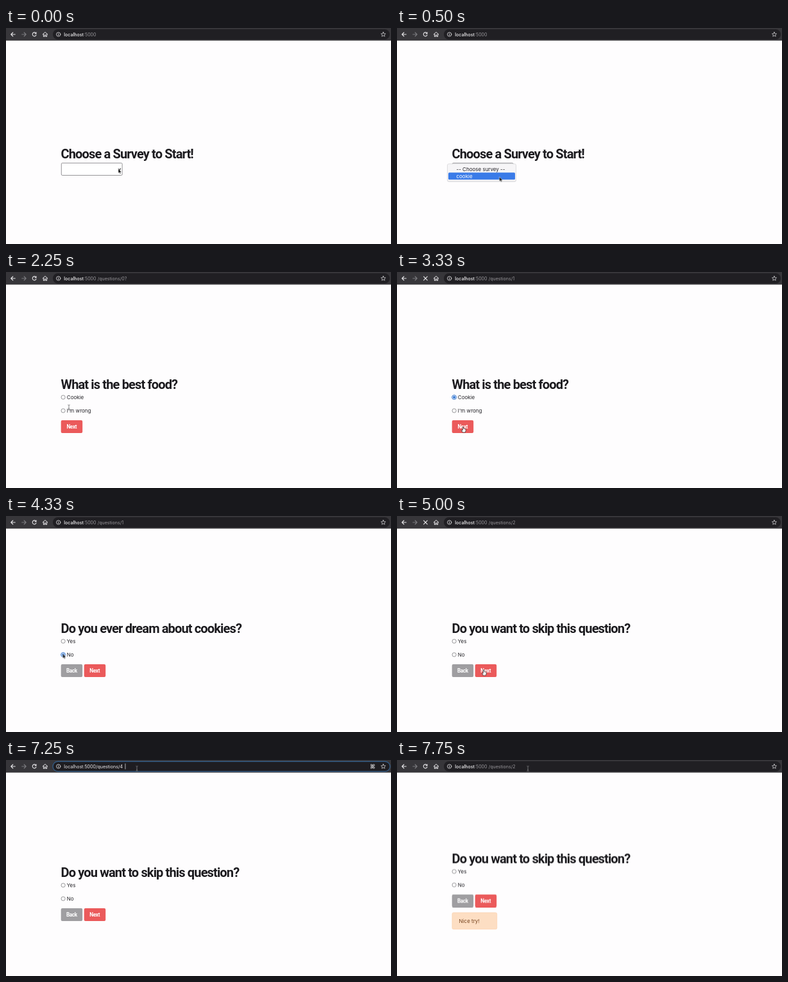
Recreate the animation shown at these times as an HTML page. Size 600x338 px, loop 8000 ms.

```html
<!DOCTYPE html>
<html lang="en">
<head>
<meta charset="utf-8">
<title>Survey</title>
<style>
html, body { margin: 0; width: 100%; height: 100%; overflow: hidden; background: #fefdfe; }
svg { display: block; width: 100%; height: 100%; }
text { font: 8px Inter, "Open Sans", sans-serif; fill: #222126; white-space: pre; }
.title { font: 700 20px Roboto, sans-serif; letter-spacing: -.86px; fill: #1b1a1e; }
.btn { font: 700 8.2px Roboto, sans-serif; letter-spacing: -.35px; fill: #fff; text-anchor: middle; }
.url text { font-size: 7.05px; fill: #98979b; }
.url .host { fill: #f4f3f5; font-weight: 500; }
.url .edit { fill: #eeedf0; }
.line { fill: none; stroke: #e6e5e8; stroke-width: 1.1; stroke-linecap: round; stroke-linejoin: round; }

/* Every .s part is hidden except in the spans of its own keyframes. */
.s { opacity: 0; }
.s, .a { animation: 8s step-end infinite; }

@keyframes choose { 0% { opacity: 1 } 15.625% { opacity: 0 } }
@keyframes unset { 0% { opacity: 1 } 9.375% { opacity: 0 } }
@keyframes picked { 9.375% { opacity: 1 } }
@keyframes menu { 2.1% { opacity: 1 } 9.375% { opacity: 0 } }
@keyframes row1 { 0% { fill: #fff } 4.7% { fill: #222126 } }
@keyframes row2 { 0% { fill: #222126 } 4.7% { fill: #fff } }
@keyframes mark { 0% { transform: none } 4.7% { transform: translateY(11px) } }
@keyframes intro { 15.625% { opacity: 1 } 24% { opacity: 0 } }
@keyframes food { 24% { opacity: 1 } 42.75% { opacity: 0 } }
@keyframes food-check { 33.25% { opacity: 1 } }
@keyframes yesno { 42.75% { opacity: 1 } }
@keyframes lift { 0% { transform: none } 94.75% { transform: translateY(-21.5px) } }
@keyframes dream { 42.75% { opacity: 1 } 61.5% { opacity: 0 } }
@keyframes dream-check { 53% { opacity: 1 } 61.5% { opacity: 0 } }
@keyframes skip { 61.5% { opacity: 1 } }
@keyframes alert { 94.75% { opacity: 1 } }

@keyframes stop {
  14.6% { opacity: 1 } 16.6% { opacity: 0 }
  22.9% { opacity: 1 } 25% { opacity: 0 }
  41.25% { opacity: 1 } 42.75% { opacity: 0 }
  60.4% { opacity: 1 } 63.4% { opacity: 0 }
  92.75% { opacity: 1 } 94.75% { opacity: 0 }
}
@keyframes reload {
  0% { opacity: 1 }
  14.6% { opacity: 0 } 16.6% { opacity: 1 }
  22.9% { opacity: 0 } 25% { opacity: 1 }
  41.25% { opacity: 0 } 42.75% { opacity: 1 }
  60.4% { opacity: 0 } 63.4% { opacity: 1 }
  92.75% { opacity: 0 } 94.75% { opacity: 1 }
}
@keyframes host { 0% { opacity: 1 } 79% { opacity: 0 } 92.75% { opacity: 1 } }
@keyframes url-start { 15.625% { opacity: 1 } 24% { opacity: 0 } }
@keyframes url-0 { 24% { opacity: 1 } 41.25% { opacity: 0 } }
@keyframes url-1 { 41.25% { opacity: 1 } 60.4% { opacity: 0 } }
@keyframes url-2 { 60.4% { opacity: 1 } 79% { opacity: 0 } 94.75% { opacity: 1 } }
@keyframes url-4 { 92.75% { opacity: 1 } 94.75% { opacity: 0 } }
@keyframes focus { 79% { opacity: 1 } 92.75% { opacity: 0 } }
@keyframes all { 79% { opacity: 1 } 88.5% { opacity: 0 } }
@keyframes erase { 88.5% { opacity: 1 } 90.6% { opacity: 0 } }
@keyframes typed { 90.6% { opacity: 1 } 92.75% { opacity: 0 } }

@keyframes arrow {
  0% { opacity: 1 } 17.75% { opacity: 0 }
  32% { opacity: 1 } 37% { opacity: 0 }
  46.5% { opacity: 1 } 57.5% { opacity: 0 }
  66.6% { opacity: 1 } 76.5% { opacity: 0 }
}
@keyframes hand {
  17.75% { opacity: 1 } 24.5% { opacity: 0 }
  37% { opacity: 1 } 46.5% { opacity: 0 }
  57.5% { opacity: 1 } 66.6% { opacity: 0 }
}
@keyframes beam { 24.5% { opacity: 1 } 32% { opacity: 0 } 76.5% { opacity: 1 } }
@keyframes path {
  0%, 2.1% { transform: translate(175px, 220px) }
  5.25% { transform: translate(160px, 233px) }
  9.375% { transform: translate(158px, 232px) }
  11.5% { transform: translate(160px, 256px) }
  12.5% { transform: translate(159.5px, 261px) }
  15.6% { transform: translate(150px, 260px) }
  18.75% { transform: translate(110px, 228px) }
  21.9%, 24% { transform: translate(100px, 221px) }
  28.1% { transform: translate(98px, 212px) }
  31.25% { transform: translate(93px, 200px) }
  33.25%, 34.4% { transform: translate(88.5px, 194.5px) }
  37.5% { transform: translate(100px, 235px) }
  39.5%, 44% { transform: translate(103px, 242px) }
  48% { transform: translate(100px, 234px) }
  52%, 55.25% { transform: translate(88.5px, 215.5px) }
  59.4%, 65.6% { transform: translate(135px, 240.5px) }
  70% { transform: translate(165px, 236px) }
  72.9% { transform: translate(186px, 228px) }
  75% { transform: translate(195px, 120px) }
  77.1%, 100% { transform: translate(204px, 13.5px) }
}
#cursor { animation: path 8s linear infinite; }
</style>
</head>
<body>
<svg viewBox="0 0 600 338">
  <defs>
    <circle id="radio" r="3.1" fill="#fff" stroke="#77767a" stroke-width=".75"/>
    <g id="checked">
      <circle r="3.4" fill="#fff" stroke="#3478d4" stroke-width="1"/>
      <circle r="2" fill="#2f74d2"/>
    </g>
    <rect id="box" width="33.5" height="20" rx="2"/>
  </defs>

  <rect width="600" height="338" fill="#fefdfe"/>

  <!-- toolbar -->
  <rect width="600" height="19.7" fill="#37363a"/>
  <rect x="73" y="2" width="525" height="16" rx="8" fill="#201f23"/>
  <rect class="s" style="animation-name:focus" x="73" y="2.3" width="525.5" height="15.6" rx="7.8" fill="#1e1d21" stroke="#34618f" stroke-width="1.2"/>
  <g class="line">
    <path d="M14.3 10H8M10.8 7L7.8 10l3 3"/>
    <path d="M24.7 10H31M28.2 7l3 3-3 3" stroke="#7b7a7e"/>
    <g class="s" style="animation-name:reload">
      <path d="M46.6 8A3 3 0 1 0 47 11"/>
      <path d="M47.4 6.6V9.3H44.7Z" fill="#e6e5e8" stroke-width=".3"/>
    </g>
    <path class="s" style="animation-name:stop" d="M41.6 7.2l5.6 5.6M47.2 7.2l-5.6 5.6"/>
    <path d="M57.2 10L61 6.5 64.8 10M58.4 9.5v3.9h1.8v-2.6h1.6v2.6h1.8V9.5" stroke-width="1"/>
    <circle cx="81.7" cy="10" r="3.2" stroke-width=".8"/>
    <path d="M81.7 9.8v1.8M81.7 8.2v.1" stroke-width=".9"/>
    <path d="M588 6.4l1.05 2.35 2.5.25-1.9 1.7.55 2.5-2.2-1.3-2.2 1.3.55-2.5-1.9-1.7 2.5-.25Z" stroke-width=".7"/>
    <path class="s" style="animation-name:focus" d="M568.4 7h2v2h-2ZM572.2 7h2v2h-2ZM568.4 11h2v2h-2ZM572.2 11h2v2h-2ZM570.4 9h1.8v2h-1.8Z" stroke-width=".7"/>
  </g>
  <g class="url">
    <g class="s" style="animation-name:host">
      <text x="90.3" y="12.6"><tspan class="host">localhost</tspan>:5000</text>
    </g>
    <text class="s" style="animation-name:url-start" x="142.7" y="12.6">/start?</text>
    <text class="s" style="animation-name:url-0" x="142.7" y="12.6">/questions/0?</text>
    <text class="s" style="animation-name:url-1" x="142.7" y="12.6">/questions/1</text>
    <text class="s" style="animation-name:url-2" x="142.7" y="12.6">/questions/2</text>
    <text class="s" style="animation-name:url-4" x="142.7" y="12.6">/questions/4</text>
    <g class="s" style="animation-name:all">
      <rect x="90" y="5.2" width="95" height="9.8" fill="#41699a"/>
      <text class="edit" x="90.3" y="12.6">localhost:5000/questions/2</text>
    </g>
    <g class="s" style="animation-name:erase">
      <text class="edit" x="90.3" y="12.6">localhost:5000/questions/</text>
      <rect x="181" y="5.5" width=".7" height="9" fill="#eeedf0"/>
    </g>
    <g class="s" style="animation-name:typed">
      <text class="edit" x="90.3" y="12.6">localhost:5000/questions/4</text>
      <rect x="185.6" y="5.5" width=".7" height="9" fill="#eeedf0"/>
    </g>
  </g>

  <!-- survey choice -->
  <g class="s" style="animation-name:choose">
    <text class="title" x="85.5" y="204">Choose a Survey to Start!</text>
    <rect x="86.3" y="211.3" width="94.8" height="19.2" rx="1.5" fill="#fff" stroke="#7b7a7e" stroke-width=".8"/>
    <text class="s" style="animation-name:unset" x="92.5" y="223.8">-- Choose survey --</text>
    <g class="s" style="animation-name:picked">
      <rect x="86.3" y="211.3" width="94.8" height="19.2" rx="2" fill="#fff" stroke="#2f6cc4" stroke-width="1.4"/>
      <text x="92.3" y="223.8">cookie</text>
    </g>
    <path class="line" d="M175.2 220.2l1.7 1.7 1.7-1.7" style="stroke:#222126"/>
    <g class="s" style="animation-name:menu">
      <rect x="78" y="213" width="108" height="28" rx="3" fill="#000" opacity=".1"/>
      <rect x="78.4" y="212.6" width="107.2" height="27.4" rx="2.5" fill="#f6f5f7" stroke="#c9c8cc" stroke-width=".5"/>
      <rect class="a" style="animation-name:mark" x="80" y="215.3" width="104" height="11" rx="1.5" fill="#3a7be8"/>
      <text class="a" style="animation-name:row1" x="92.5" y="223.8">-- Choose survey --</text>
      <text class="a" style="animation-name:row2" x="92.5" y="234.8">cookie</text>
    </g>
  </g>

  <!-- start page -->
  <g class="s" style="animation-name:intro">
    <text class="title" x="85.5" y="204">Cookie Survey</text>
    <use href="#box" x="86" y="211" fill="#eb5a5b"/>
    <text class="btn" x="102.5" y="224">Start</text>
  </g>

  <!-- first question -->
  <g class="s" style="animation-name:food">
    <text class="title" x="85.5" y="183">What is the best food?</text>
    <use href="#radio" x="89.1" y="196"/>
    <use href="#checked" class="s" style="animation-name:food-check" x="89.1" y="196"/>
    <text x="94.8" y="199">Cookie</text>
    <use href="#radio" x="89.1" y="217"/>
    <text x="94.8" y="220">I'm wrong</text>
    <use href="#box" x="85.7" y="232" fill="#eb5a5b"/>
    <text class="btn" x="102.3" y="245.2">Next</text>
  </g>

  <!-- yes / no questions -->
  <g class="s" style="animation-name:yesno">
    <g class="a" style="animation-name:lift">
      <text class="title s" style="animation-name:dream" x="85.5" y="183">Do you ever dream about cookies?</text>
      <text class="title s" style="animation-name:skip" x="85.5" y="183">Do you want to skip this question?</text>
      <use href="#radio" x="89.1" y="196"/>
      <text x="94.8" y="199">Yes</text>
      <use href="#radio" x="89.1" y="217"/>
      <use href="#checked" class="s" style="animation-name:dream-check" x="89.1" y="217"/>
      <text x="94.8" y="220">No</text>
      <use href="#box" x="85.7" y="232" fill="#9f9ea1"/>
      <text class="btn" x="102.4" y="245.2">Back</text>
      <use href="#box" x="121.7" y="232" fill="#eb5a5b"/>
      <text class="btn" x="138.2" y="245.2">Next</text>
    </g>
    <g class="s" style="animation-name:alert">
      <rect x="86" y="238.9" width="69.7" height="25.8" rx="2" fill="#fddec3" stroke="#fbd2ae" stroke-width=".8"/>
      <text x="96.6" y="254.7" style="fill:#74401c">Nice try!</text>
    </g>
  </g>

  <g id="cursor">
    <path class="s" style="animation-name:arrow" d="M0 0V7.2L1.6 5.8 2.7 8.3 3.9 7.8 2.9 5.4H5Z" fill="#111" stroke="#fff" stroke-width=".5"/>
    <path class="s" style="animation-name:hand" d="M-.7 .6Q0-.3 .7 .6V3.2L1.5 2.9 2.1 3.4 2.9 3.2 3.4 3.9 4.2 3.9V6.4L3.3 9H-.6L-2.6 5.8Q-2.4 4.6-.7 5.6Z" fill="#fff" stroke="#222" stroke-width=".7"/>
    <path class="s" style="animation-name:beam" d="M-1.7-4Q0-4 0-3Q0-4 1.7-4M0-3V3M-1.7 4Q0 4 0 3Q0 4 1.7 4M-.9 1.6H.9" fill="none" stroke="#77767a" stroke-width=".9"/>
  </g>
</svg>
</body>
</html>
```
